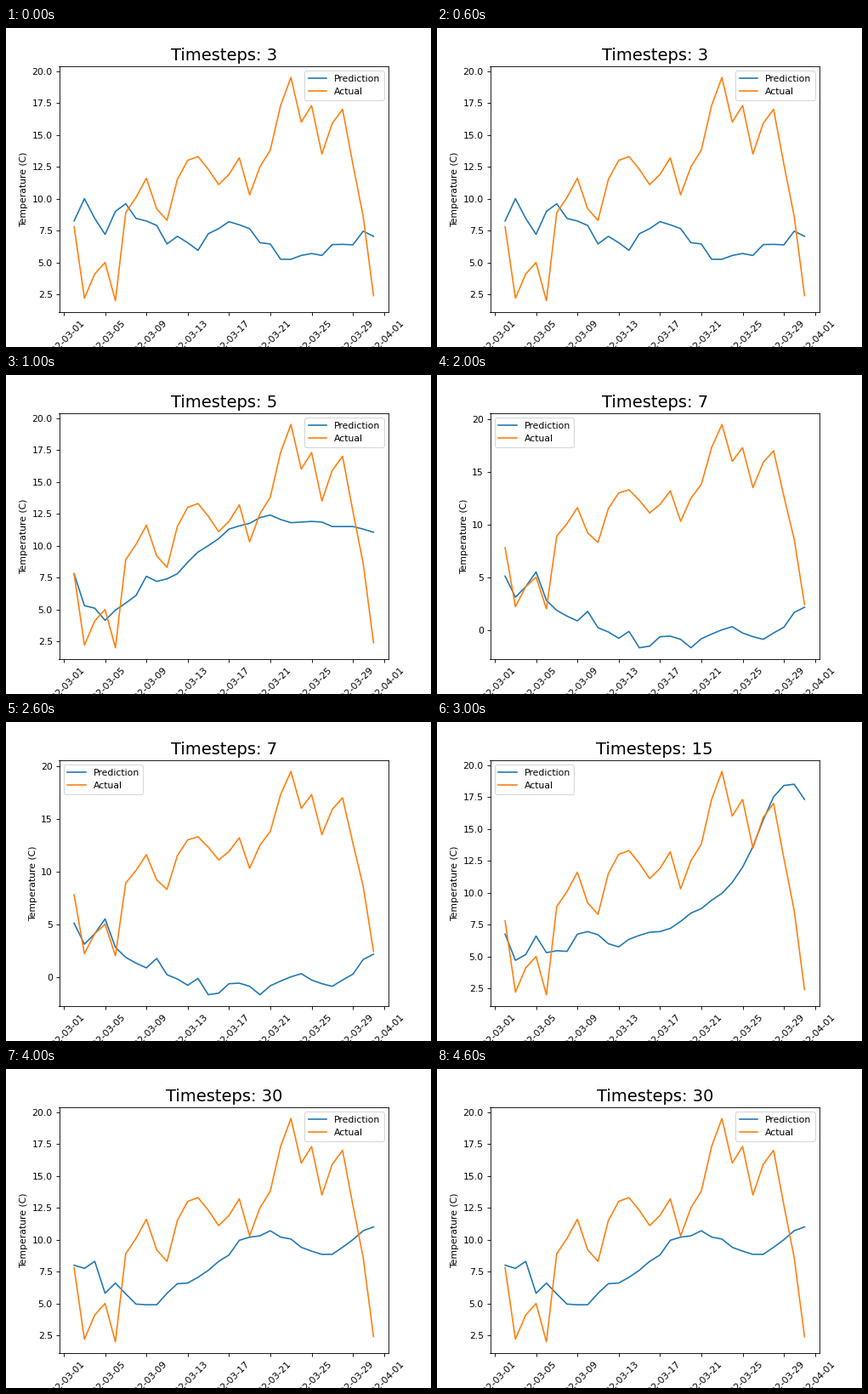
A matplotlib script that plays this animation: 500 by 375 pixels, repeating every 5 s.

```python
import numpy as np
import matplotlib.pyplot as plt
from matplotlib.animation import FuncAnimation

plt.rcParams["font.family"] = "DejaVu Sans"

days = np.arange("2022-03-02", "2022-04-01", dtype="datetime64[D]")

actual = [7.8, 2.2, 4.1, 5.0, 2.0, 8.9, 10.1, 11.6, 9.2, 8.3,
          11.5, 13.0, 13.3, 12.3, 11.1, 11.9, 13.2, 10.3, 12.5, 13.8,
          17.3, 19.5, 16.0, 17.3, 13.5, 15.9, 17.0, 12.7, 8.6, 2.4]

steps_3 = [8.25, 10.0, 8.45, 7.2, 9.0, 9.6, 8.45, 8.25, 7.9, 6.45,
           7.05, 6.55, 5.95, 7.25, 7.65, 8.2, 7.95, 7.65, 6.55, 6.45,
           5.25, 5.25, 5.55, 5.7, 5.55, 6.4, 6.42, 6.38, 7.45, 7.05]

steps_5 = [7.8, 5.3, 5.1, 4.15, 4.95, 5.5, 6.1, 7.6, 7.2, 7.4,
           7.8, 8.7, 9.5, 10.0, 10.55, 11.3, 11.55, 11.75, 12.2, 12.4,
           12.05, 11.8, 11.85, 11.9, 11.85, 11.5, 11.5, 11.5, 11.3, 11.05]

steps_7 = [5.1, 3.1, 4.1, 5.5, 2.8, 1.85, 1.3, 0.85, 1.75, 0.2,
           -0.2, -0.8, -0.15, -1.7, -1.55, -0.65, -0.6, -0.9, -1.7, -0.85,
           -0.4, 0.0, 0.3, -0.3, -0.65, -0.9, -0.3, 0.25, 1.65, 2.15]

steps_15 = [6.75, 4.7, 5.15, 6.6, 5.3, 5.45, 5.4, 6.75, 6.95, 6.7,
            6.0, 5.75, 6.35, 6.65, 6.9, 6.95, 7.2, 7.75, 8.4, 8.75,
            9.4, 9.95, 10.8, 12.0, 13.6, 15.7, 17.5, 18.4, 18.5, 17.3]

steps_30 = [8.0, 7.75, 8.3, 5.8, 6.6, 5.75, 4.95, 4.9, 4.9, 5.8,
            6.55, 6.6, 7.05, 7.6, 8.3, 8.8, 9.95, 10.2, 10.3, 10.7,
            10.2, 10.05, 9.4, 9.1, 8.85, 8.85, 9.4, 10.0, 10.7, 11.0]

scenes = [
    (3, steps_3, "upper right"),
    (5, steps_5, "upper right"),
    (7, steps_7, "upper left"),
    (15, steps_15, "upper left"),
    (30, steps_30, "upper right"),
]

fig, ax = plt.subplots(figsize=(6.4, 4.8), dpi=78.125)


def draw(i):
    steps, prediction, corner = scenes[i]
    ax.clear()
    ax.plot(days, prediction, color="tab:blue", label="Prediction")
    ax.plot(days, actual, color="tab:orange", label="Actual")
    ax.set_title(f"Timesteps: {steps}", fontsize=18)
    ax.set_ylabel("Temperature (C)")
    ax.tick_params(axis="x", rotation=45)
    ax.legend(loc=corner)
    return ax.get_children()


anim = FuncAnimation(fig, draw, frames=len(scenes), init_func=lambda: draw(0),
                     interval=1000, repeat=True, repeat_delay=0, blit=False)
plt.show()
```
